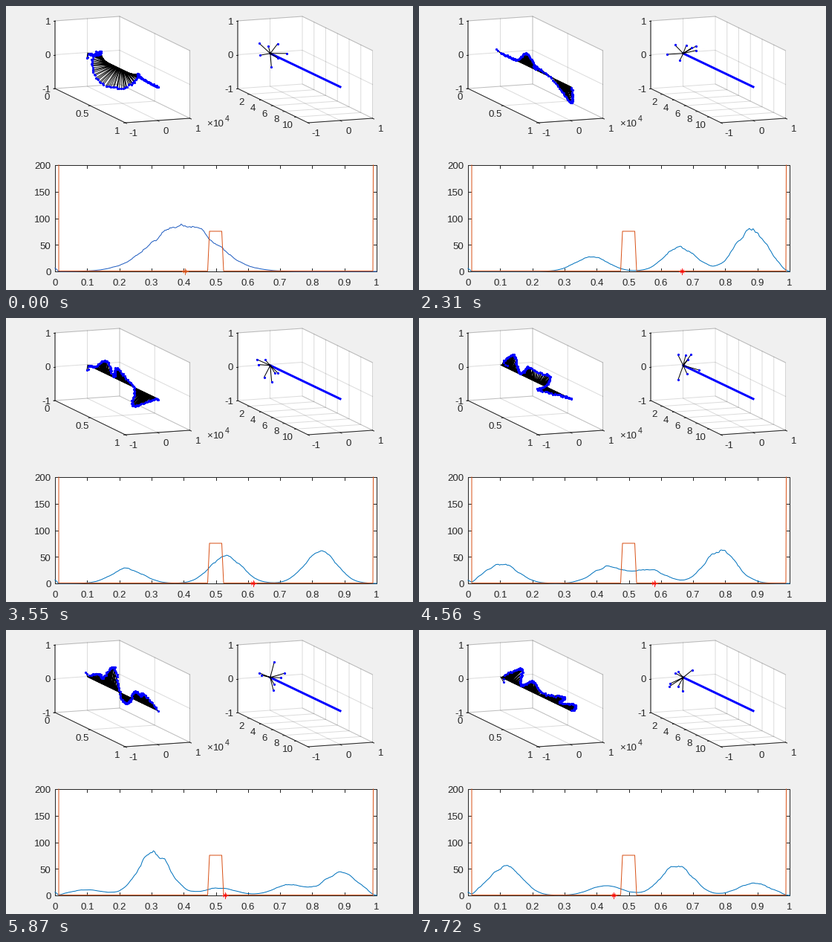
Recreate the animation shown at these times as a matplotlib script. Size 548 by 382 pixels, loop 8000 ms.

```python
import numpy as np
import matplotlib.pyplot as plt
from matplotlib.animation import FuncAnimation

W, H, DPI = 548, 382, 100
PT = 72 / DPI                     # one pixel in points
LOOP, TICK = 8000, 40
FIRST, HOLD = 40, 318.75          # ms before the first change, ms between changes
DARK, BLUE, ORANGE = '#262626', '#0072bd', '#d95319'

plt.rcParams['font.family'] = 'Liberation Sans'
fig = plt.figure(figsize=(W / DPI, H / DPI), dpi=DPI, facecolor='#f0f0f0')
ax = fig.add_axes([0, 0, 1, 1])
ax.set(xlim=(0, W), ylim=(H, 0))
ax.axis('off')


def line(points, color=DARK, width=1.0, **kw):
    x, y = zip(*points)
    return ax.plot(x, y, color=color, lw=width * PT, **kw)[0]


def dots(size):
    return line([(0, 0)], 'blue', 0, ls='', marker='o', ms=size * PT, mew=0)


def label(x, y, text, size=13.3, ha='center'):
    """Text with digits centred vertically on y."""
    ax.text(x, y + size * .36, text, size=size * PT, color=DARK, ha=ha)


def box3d(left, xticks):
    """Axes cube; a, b, c run from 0 to 1 along x, y and z."""
    def at(a, b, c):
        return left + 94.5 * a + 87 * b, 111 + 46 * a - 6 * b - 91 * c

    def grid(points):
        line(points, DARK, alpha=.16)

    hull = [at(0, 0, 0), at(0, 0, 1), at(0, 1, 1), at(1, 1, 1), at(1, 1, 0), at(1, 0, 0)]
    ax.fill(*zip(*hull), color='white', lw=0)
    grid(hull)
    for f in (0, .5, 1):
        grid([at(0, 0, f), at(0, 1, f), at(1, 1, f)])
        grid([at(0, f, 1), at(0, f, 0), at(1, f, 0)])
    for a in xticks:
        grid([at(a, 1, 1), at(a, 1, 0), at(a, 0, 0)])
    line([at(0, 0, 1), at(0, 0, 0), at(1, 0, 0), at(1, 1, 0)])

    for value in (-1, 0, 1):
        f = (value + 1) / 2
        x, y = at(0, 0, f)
        line([(x, y), (x - 2, y)])
        label(x - 6, y, str(value), ha='right')
        x, y = at(1, f, 0)
        line([(x, y), (x + 2, y + 1)])
        label(x + 11, y + 13, str(value))
    for a, text in xticks.items():
        x, y = at(a, 0, 0)
        line([(x, y), (x - 2, y + .2)])
        label(x - 11, y + 10, text)


def bottom_axes():
    ax.fill([66, 499, 499, 66], [214, 214, 357, 357], color='white', lw=0)
    line([(66, 214), (499, 214), (499, 357), (66, 357), (66, 214)])
    for i in range(11):
        x = 66 + 43.3 * i
        line([(x, 357), (x, 353)])
        line([(x, 214), (x, 218)])
        label(x, 371.5, f'{i / 10:g}')
    for i in range(5):
        y = 357 - 35.75 * i
        line([(66, y), (70, y)])
        line([(499, y), (495, y)])
        label(60.5, y + .5, str(50 * i), ha='right')


box3d(66, {0: '0', .5: '0.5', 1: '1'})
box3d(312, {n / 12: str(n) for n in range(2, 11, 2)})
label(270, 157, '×', ha='left')
label(279, 157, '10', ha='left')
label(294.5, 151, '4', 10.5, 'left')
bottom_axes()

X = np.linspace(0, 1, 256)
S = np.linspace(0, 1, 170)
SPREAD = 8                              # steps until the first pulse has broken up
KEY_STEPS = [0, 4, 8, 12, 15, 19, 25]   # steps at which pulse heights are given
# start, place after the break-up, drift per step, angle then, turn per step, heights
PULSES = [
    (.40, .385, -.040, 95, -4, [88, 38, 28, 27, 37, 11, 0]),
    (.40, .660, -.032, 145, -6, [0, 0, 45, 52, 30, 80, 55]),
    (.40, .660, -.0135, 281, -33, [0, 30, 0, 0, 25, 14, 19]),
    (.40, .880, -.0135, 292, -16.8, [0, 36, 79, 60, 62, 20, 56]),
    (.89, .890, 0, 318, -18, [0, 23, 0, 0, 0, 44, 23]),
]


def path(start, spread, drift, step):
    """Ease out from start to spread, then drift evenly."""
    ease = np.sin(np.pi / 2 * min(step / SPREAD, 1))
    return start + (spread - start) * ease + drift * max(step - SPREAD, 0)


def wave(step, rng):
    """Power along X and displacement of the string along S, in pixels."""
    late = max(step - SPREAD, 0)
    coil = max(0, 1 - step / 4)
    width = .07 * (1 + max(0, 1 - step / SPREAD))
    twist = coil * (125 + 620 * (X - .4))
    edge = np.clip(np.minimum(X, 1 - X) / .03, 0, 1)

    # A narrow spike turns at the fixed end.
    power = 6 * np.exp(-(X / .007) ** 2)
    phasor = power * np.exp(1j * np.radians(30 * step - 95))
    for start, spread, drift, angle, turn, heights in PULSES:
        centre = max(path(start, spread, drift, step), .1)
        height = np.interp(step, KEY_STEPS, heights)
        pulse = edge * height * np.exp(-((X - centre) / width) ** 2)
        power = power + pulse
        phasor = phasor + pulse * np.exp(1j * np.radians(angle + turn * late + twist))

    ripple = np.convolve(rng.normal(size=X.size + 4), np.ones(5) / 5, 'valid')
    power = power * (1 + .07 * ripple)
    shift = 44.5 * np.sqrt(power / 200) * phasor / (power + 1e-9)
    jitter = rng.normal(scale=.5, size=(2, S.size))
    return (power, np.interp(S, X, shift.real) + jitter[0],
            np.interp(S, X, shift.imag) + jitter[1])


def stems(x0, y0, x1, y1):
    gap = np.full_like(x1, np.nan)
    return (np.column_stack([x0 + 0 * x1, x1, gap]).ravel(),
            np.column_stack([y0 + 0 * y1, y1, gap]).ravel())


BASE_X, BASE_Y = 110 + 95 * S, 63.2 + 45.7 * S
HUB_X, HUB_Y = 355.8, 63.8
MODES = np.arange(7)

string_stems = line([(0, 0)], 'black', .9)
string_dots = dots(3.2)
line([(HUB_X, HUB_Y), (450, 108.8)], 'blue', 3)
mode_stems = line([(0, 0)], 'black')
mode_dots = dots(3.2)
curve = line([(0, 0)], BLUE)
line([(71, 214), (71, 356.4), (271.5, 356.4), (274, 303), (290.5, 303),
      (293, 356.4), (494, 356.4), (494.5, 214)], ORANGE)
star = [line([(0, 0)], 'red', .9) for _ in range(4)]


def draw(frame):
    time = frame * TICK + TICK - 1
    step = int((time - FIRST) // HOLD) + 1
    power, dx, dy = wave(step, np.random.default_rng(step))
    x, y = BASE_X + dx, BASE_Y - dy
    string_stems.set_data(*stems(BASE_X, BASE_Y, x, y))
    string_dots.set_data(x, y)

    angle = 2.4 * MODES + .15 * MODES ** 2 * step + .4 * step
    length = 22 - 2 * MODES
    x, y = HUB_X + length * np.cos(angle), HUB_Y - length * np.sin(angle)
    mode_stems.set_data(*stems(HUB_X, HUB_Y, x, y))
    mode_dots.set_data(x, y)

    curve.set_data(66 + 433 * X, 357 - .715 * power)
    curve.set_color('#1f5cc0' if step == 0 else BLUE)
    centre = 66.5 + 433 * path(.403, .665, -.0125, step)
    for i, ray in enumerate(star):
        r = 2.8 if i % 2 else 4
        rx, ry = r * np.cos(i * np.pi / 4), r * np.sin(i * np.pi / 4)
        ray.set_data([centre - rx, centre + rx], [357 - ry, 357 + ry])
        ray.set_color(ORANGE if step == 0 else 'red')
    return []


anim = FuncAnimation(fig, draw, frames=LOOP // TICK, interval=TICK,
                     init_func=lambda: [], repeat=True, repeat_delay=0)
plt.show()
```
